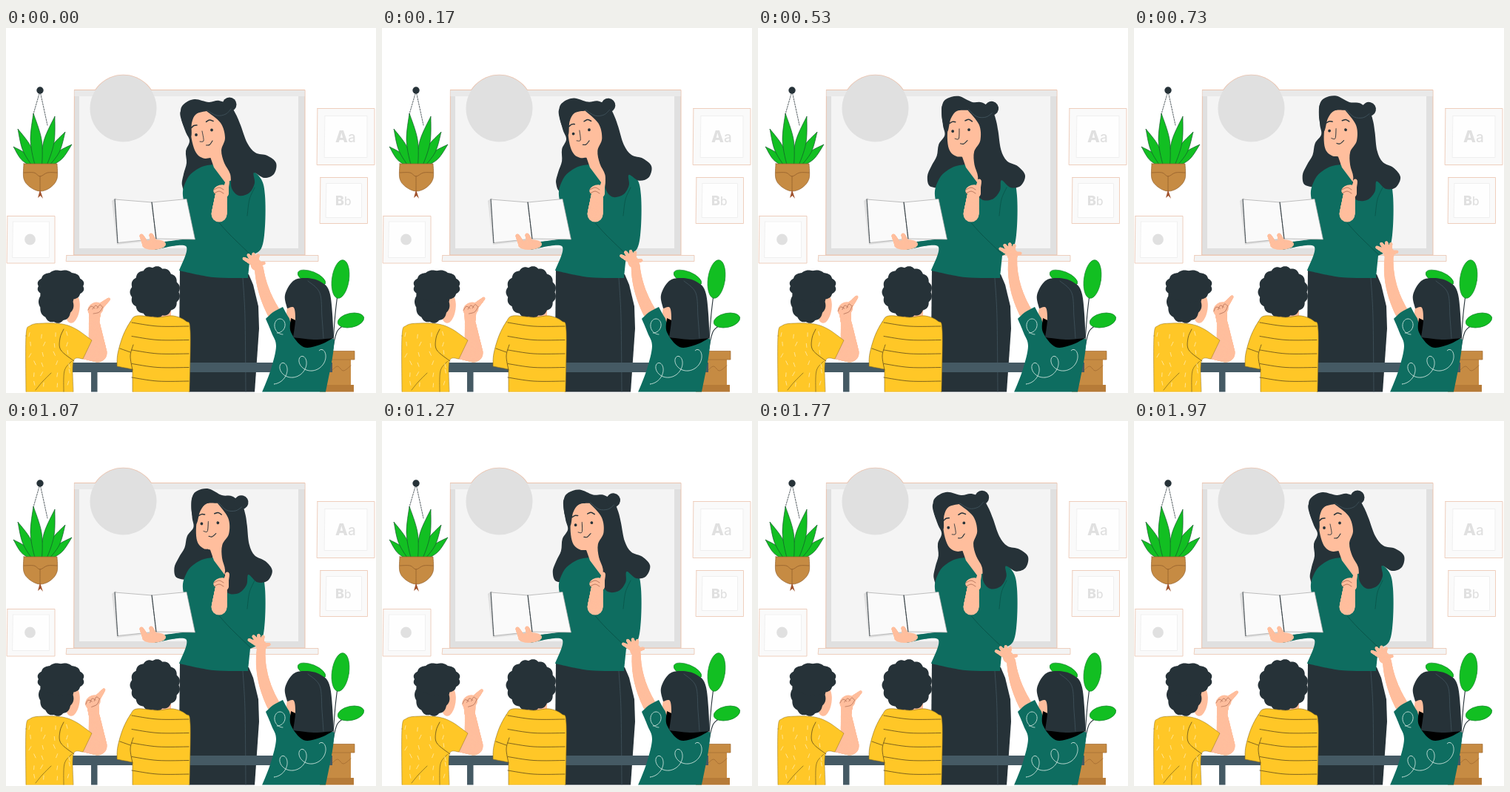
These frames come from a looping animation (500 by 492 pixels, 2010 ms). An HTML page with a canvas:

```html
<!DOCTYPE html>
<html lang="en">
<head>
<meta charset="utf-8">
<title>Classroom</title>
<style>
html, body { margin: 0; width: 100%; height: 100%; overflow: hidden; background: #fff; }
canvas { display: block; width: 500px; height: 492px; }
</style>
</head>
<body>
<canvas id="stage"></canvas>
<script>
const W = 500, H = 492, LOOP = 2010, TAU = Math.PI * 2;
const DARK = '#263238', SLATE = '#455a64', SKIN = '#ffbe9d', CREASE = '#a8674f',
      TEAL = '#0e6d60', FOLD = '#095348', GOLD = '#ffc727', INK = '#5d4a1a',
      LEAF = '#12bf22', POT = '#c68b43', BARK = '#94602c', GREY = '#e0e0e0', EDGE = '#ebc3ae';
const canvas = document.getElementById('stage');
const ctx = canvas.getContext('2d');
const dpr = window.devicePixelRatio || 1;
canvas.width = W * dpr;
canvas.height = H * dpr;

const mix = (a, b, k) => a + (b - a) * k;

function paint(fill, stroke, width = 0.7) {
  if (fill) { ctx.fillStyle = fill; ctx.fill(); }
  if (stroke) { ctx.strokeStyle = stroke; ctx.lineWidth = width; ctx.stroke(); }
}
// Smooth curve through flat x,y pairs; a repeated point makes a corner.
function trace(p, closed) {
  const n = p.length / 2;
  const at = i => {
    const k = closed ? (i + n) % n : Math.max(0, Math.min(n - 1, i));
    return [p[2 * k], p[2 * k + 1]];
  };
  ctx.beginPath();
  ctx.moveTo(p[0], p[1]);
  for (let i = 0; i < (closed ? n : n - 1); i++) {
    const [a, b, c, d] = [at(i - 1), at(i), at(i + 1), at(i + 2)];
    if (b[0] === c[0] && b[1] === c[1]) continue;
    ctx.bezierCurveTo(b[0] + (c[0] - a[0]) / 6, b[1] + (c[1] - a[1]) / 6,
      c[0] - (d[0] - b[0]) / 6, c[1] - (d[1] - b[1]) / 6, c[0], c[1]);
  }
  if (closed) ctx.closePath();
}
function blob(p, fill, stroke, width) { trace(p, true); paint(fill, stroke, width); }
function line(p, color, width = 0.8) { trace(p, false); paint(null, color, width); }
function poly(p, fill, stroke, width) {
  ctx.beginPath();
  for (let i = 0; i < p.length; i += 2) ctx.lineTo(p[i], p[i + 1]);
  ctx.closePath();
  paint(fill, stroke, width);
}
function box(x0, y0, x1, y1, fill, stroke, width) {
  poly([x0, y0, x1, y0, x1, y1, x0, y1], fill, stroke, width);
}
function oval(x, y, rx, ry, fill, deg = 0, stroke) {
  ctx.beginPath();
  ctx.ellipse(x, y, rx, ry, deg * TAU / 360, 0, TAU);
  paint(fill, stroke);
}
function dot(x, y, r, fill) { oval(x, y, r, r, fill); }

// Tapered limb along a quadratic curve; w0 and w1 are the end widths.
function limb(x0, y0, x1, y1, w0, w1, cx = (x0 + x1) / 2, cy = (y0 + y1) / 2) {
  for (let i = 0; i <= 40; i++) {
    const k = i / 40;
    dot(mix(mix(x0, cx, k), mix(cx, x1, k), k),
      mix(mix(y0, cy, k), mix(cy, y1, k), k), mix(w0, w1, k) / 2, SKIN);
  }
}
// Oval with n round bumps along its edge.
function curls(x, y, rx, ry, n) {
  ctx.beginPath();
  for (let i = 0; i < 240; i++) {
    const a = i / 240 * TAU, r = 0.94 + 0.06 * Math.abs(Math.sin(a * n / 2));
    ctx.lineTo(x + rx * r * Math.cos(a), y + ry * r * Math.sin(a));
  }
  ctx.closePath();
  paint(DARK);
}
function turned(x, y, deg, draw) {
  ctx.save();
  ctx.translate(x, y);
  ctx.rotate(deg * TAU / 360);
  ctx.translate(-x, -y);
  draw();
  ctx.restore();
}
function seeded(seed) {
  return () => (seed = seed * 16807 % 2147483647) / 2147483647;
}

function ease(x) {
  let lo = 0, hi = 1, s = 0.5;
  for (let i = 0; i < 24; i++) {
    s = (lo + hi) / 2;
    if (0.75 * s * (1 - s) + s ** 3 < x) lo = s; else hi = s;
  }
  return 0.3 * s * (1 - s) ** 2 + 3 * (1 - s) * s * s + s ** 3;
}
// 0 is the leaning pose, 1 the upright one.
function swing(t) {
  if (t < 1000) return ease(t / 1000);
  return t < 1050 ? 1 : 1 - ease((t - 1050) / 960);
}

function label(a, b, x, y, size) {
  ctx.fillStyle = GREY;
  ctx.font = `800 ${size}px Inter, sans-serif`;
  ctx.fillText(a, x, y);
  const w = ctx.measureText(a).width;
  ctx.font = `500 ${size * 0.86}px Inter, sans-serif`;
  ctx.fillText(b, x + w, y);
}
function frame(x0, y0, x1, y1, m) {
  box(x0, y0, x1, y1, '#fafafa', EDGE, 0.8);
  box(x0 + m, y0 + m, x1 - m, y1 - m, '#fefefe', '#efefef', 0.9);
}
function wall() {
  dot(158.5, 108.5, 45.8, EDGE);
  box(92, 83.5, 404, 306, GREY, EDGE, 1);
  box(92.5, 84, 403.5, 92, '#e9e9e9');
  box(99, 92, 395, 297, '#f4f4f4');
  box(81.5, 306.5, 422, 314.5, '#f4f4f4', EDGE, 0.8);
  dot(158.5, 108.5, 45, GREY);
  frame(420.5, 108.5, 498, 184.5, 10);
  label('A', 'a', 445, 154, 22);
  frame(424.5, 201.5, 488.5, 263.5, 8);
  label('B', 'b', 445, 238.5, 18);
  frame(1.5, 253.5, 66, 317, 7.5);
  dot(32.5, 285, 7.4, GREY);
}

function leaf(x, y, bx, by, w) {
  const len = Math.hypot(x - bx, y - by);
  const nx = (by - y) / len * w, ny = (x - bx) / len * w;
  const mx = mix(bx, x, 0.5), my = mix(by, y, 0.5);
  blob([bx + nx / 2, by, mx + nx, my + ny, x, y, x, y, mx - nx, my - ny, bx - nx / 2, by],
    LEAF, '#14572a', 0.7);
}
function hangingPlant() {
  ctx.setLineDash([2, 1.5]);
  line([46, 85, 37, 116], DARK);
  line([46, 85, 56, 131], DARK);
  ctx.setLineDash([]);
  dot(46, 84, 4.7, DARK);
  const tips = [10, 160, 89, 157, 16, 136, 80, 140, 66, 119, 37, 115];
  for (let i = 0; i < tips.length; i += 2)
    leaf(tips[i], tips[i + 1], mix(46, tips[i], 0.2), 188, 5 + i * 0.25);
  blob([24, 183, 24, 183, 69, 183, 69, 183, 69, 203, 60, 215, 46, 220, 32, 214, 24, 203], POT, BARK);
  line([24, 195, 38, 195, 46, 200, 56, 195, 69, 195], BARK);
  line([46, 200, 46, 219], BARK);
  poly([46, 218, 43, 229, 46.5, 226, 50, 230], '#a0522d');
}
function floorPlant() {
  line([449, 352, 445, 385, 441, 436], DARK, 1.1);
  line([466, 396, 448, 408, 441, 436], DARK, 1.1);
  oval(452, 338.5, 11.5, 26, LEAF, 8, '#14822a');
  oval(466, 394, 18, 9.5, LEAF, -12, '#14822a');
  oval(413, 337, 20, 8.5, LEAF, 22, '#14822a');
  box(428, 446, 466, 482, POT);
  box(426, 435.5, 471, 447, POT, '#a36b31');
  box(424, 481, 470, 491, '#b67b38');
  line([440, 462, 448, 456, 456, 462, 466, 455], '#a36b31');
}

function face() {
  blob([250, 124, 250, 144, 254, 162, 260, 172, 269, 176, 280, 176, 297, 190, 304, 160, 290, 115, 265, 112], SKIN);
  dot(257, 144, 1.9, DARK);
  dot(278, 137.5, 1.9, DARK);
  line([250.5, 134.5, 254, 131.5, 258, 131], DARK, 1.5);
  line([270.5, 126.5, 275, 124, 280, 125.5], DARK, 1.5);
  line([265, 139, 267, 152, 262, 153], DARK, 0.9);
  line([270.5, 158, 275, 157.5, 279, 152], DARK, 1.1);
}
function hair() {
  blob([236, 112, 241, 102, 255, 96, 274, 100, 288, 98, 303, 105, 311, 117, 317, 131, 326, 155,
    337, 168, 353, 172, 365, 182, 362, 197, 349, 202, 335, 195, 336, 209, 329, 222, 315, 226,
    305, 216, 303, 197, 295, 182, 291, 165, 296, 148, 290, 128, 271, 112, 271, 112,
    257, 116, 251, 128, 250, 146, 240, 132], DARK);
  dot(302, 103, 9.5, DARK);
  line([272, 111, 285, 118, 297, 116, 304, 109], SLATE, 0.7);
}
function backHair() {
  blob([236, 112, 242, 138, 248, 152, 243, 166, 244, 182, 240, 197, 238, 212, 246, 224, 270, 215, 285, 170, 260, 110], DARK);
}
function teacher(p) {
  turned(283, 167, 16 * p, backHair);
  poly([235, 325, 328, 332, 334, 346, 341, 375, 342, 405, 336, 491, 247, 491, 234, 420], DARK);
  line([320, 337, 323, 390, 324, 491], SLATE, 0.7);
  blob([272, 185, 253, 194, 243, 207, 239, 226, 247, 260, 247, 284, 247, 284, 206, 289, 206, 289,
    200, 299, 200, 299, 243, 294, 234, 327, 234, 327, 280, 336, 327, 337, 327, 337, 330, 307,
    330, 307, 345, 297, 350, 267, 350, 226, 345, 204, 330, 191, 303, 184], TEAL);
  line([336, 215, 329, 231, 326, 253], FOLD);
  poly([274, 168, 281, 188, 296, 208, 306, 205, 302, 160], SKIN);
  book();
  turned(283, 171, 14.3 * p, () => { face(); hair(); });
  line([286, 260, 302, 278, 331, 306], FOLD, 0.9);
  limb(288, 251, 291, 222, 21, 15);
  oval(290, 218, 10, 6.5, SKIN, -15);
  limb(297, 224, 299, 206, 7, 5);
  for (let i = 0; i < 2; i++) line([281, 218 + i * 5, 288, 215 + i * 5, 294, 218 + i * 5], CREASE);
}
function book() {
  poly([143, 233, 148, 229, 202, 286, 150, 292], '#dedede');
  poly([147, 231, 197, 235, 203, 284, 151, 289.5], '#fafafa', '#a5a5a5');
  poly([197, 235, 244, 230.5, 255.5, 285, 203, 284], '#fafafa', '#a5a5a5');
  line([147, 231, 151, 289.5], DARK);
  line([197, 235, 203, 284], DARK, 1);
  oval(200, 292, 16, 7, SKIN, -3);
  limb(188, 290, 183, 280, 8, 5);
  limb(200, 289, 196, 279, 8, 5);
}

function table() {
  box(90, 451, 441, 464, SLATE);
  box(115, 464, 123.5, 491, SLATE);
}

function pointingBoy(p) {
  oval(90, 378, 9.5, 20, SKIN, 8);
  curls(68, 369, 24, 29, 11);
  curls(74, 348, 32, 22, 12);
  limb(105, 433, 124, 438, 26, 25);
  limb(124, 438, 119, 395, 25, 14);
  blob([27, 415, 33, 401, 50, 398, 76, 399, 95, 406, 116, 421, 116, 421, 104, 446, 104, 446,
    91, 449, 91, 491, 91, 491, 27, 491, 27, 491], GOLD, '#8a6b1d', 0.5);
  line([78, 406, 73, 418, 74, 434, 92, 449], INK);
  line([89, 449, 79, 462, 78, 491], INK, 0.6);
  line([40, 488, 49, 477, 61, 465], INK, 0.6);
  const rnd = seeded(11);
  for (let i = 0; i < 24; i++) {
    const x = 32 + (i % 4) * 16 + rnd() * 6, y = 408 + Math.floor(i / 4) * 13 + rnd() * 6;
    line([x, y, x + rnd() * 6 - 3, y + 5], '#ffe9a6', 0.9);
  }
  turned(119, 397, -11.5 * p, () => {
    oval(121, 379, 11, 9, SKIN, -25);
    limb(119, 397, 120, 384, 14, 16);
    limb(128, 375, 139, 365.5, 8, 4);
    for (let i = 0; i < 3; i++)
      line([111 + i * 6, 380 - i, 115 + i * 6, 375 - i, 120 + i * 5, 378 - i], CREASE, 0.7);
    line([118, 385, 126, 383, 131, 376], CREASE, 0.7);
  });
}

function stripedBoy() {
  box(190, 380, 223, 394, SKIN);
  curls(201.5, 356, 34, 35, 15);
  blob([168, 396, 177, 388, 205, 390, 226, 388, 243, 395, 249, 408, 248, 491, 248, 491, 171, 491,
    171, 491, 171, 460, 171, 460, 150, 456, 150, 456, 151, 439, 158, 415], GOLD, '#8a6b1d', 0.6);
  for (let i = 0; i < 5; i++) {
    const y = 397 + i * 18.5;
    line([170, y, 205, y + 5, 247, y + 5], INK);
  }
  line([154, 432, 168, 437], INK);
  line([171, 461, 168, 442, 172, 427], INK);
}

function raisedArm(p) {
  const dx = 7 * p, dy = -16 * p;
  limb(342 + dx * 0.4, 324 + dy, 362, 384, 12, 18, 345 - dx * 0.5, 354 + dy * 0.5);
  ctx.save();
  ctx.translate(dx, dy);
  oval(338, 319, 7.5, 8, SKIN);
  for (let i = 0; i < 5; i++) {
    const a = (208 + i * 26 + (i === 4 ? 38 : 0)) * TAU / 360, r = 17.5 - i * 1.4;
    limb(337, 319, 337 + r * Math.cos(a), 319 + r * Math.sin(a), 7, 4);
  }
  ctx.restore();
}
// Chain of loops running from (x, y) along (sx, sy) per turn.
function loops(x, y, sx, sy, r, turns) {
  ctx.beginPath();
  for (let i = 0; i <= turns * 40; i++) {
    const u = i / 40, a = u * TAU;
    ctx.lineTo(x + sx * u + r * 0.9 * Math.sin(a), y + sy * u + r * Math.cos(a));
  }
  paint(null, '#b9d8d0', 1);
}
function girl(p) {
  raisedArm(p);
  oval(386, 384, 7, 13, SKIN);
  blob([351, 392, 351, 392, 361, 383, 374, 376, 374, 376, 382, 390, 392, 402, 444, 420, 444, 420,
    441, 445, 432, 491, 432, 491, 346, 491, 346, 491, 358, 460, 365, 429, 359, 411], TEAL);
  blob([385, 391, 385, 391, 385, 410, 402, 430, 424, 427, 442, 418, 442, 418], '#000');
  blob([377, 360, 388, 341, 405, 337, 425, 342, 438, 359, 443, 418, 443, 418, 416, 420, 388, 417,
    388, 417, 391, 394, 389, 377, 380, 378, 380, 378], DARK);
  line([408, 341, 424, 357, 427, 390, 429, 418], SLATE, 0.7);
  loops(366, 401, 8, 2, 10, 1);
  loops(362, 468, 26, -9, 12, 2.6);
}

function draw(now) {
  const p = swing(now % LOOP);
  ctx.setTransform(dpr, 0, 0, dpr, 0, 0);
  ctx.fillStyle = '#fff';
  ctx.fillRect(0, 0, W, H);
  ctx.save();
  ctx.beginPath();
  ctx.rect(0, 0, W, 490.5);
  ctx.clip();
  ctx.lineCap = ctx.lineJoin = 'round';
  wall();
  hangingPlant();
  floorPlant();
  teacher(p);
  table();
  pointingBoy(p);
  stripedBoy();
  girl(p);
  ctx.restore();
}

const start = performance.now();
function tick() {
  draw(performance.now() - start);
  requestAnimationFrame(tick);
}
tick();
</script>
</body>
</html>
```
